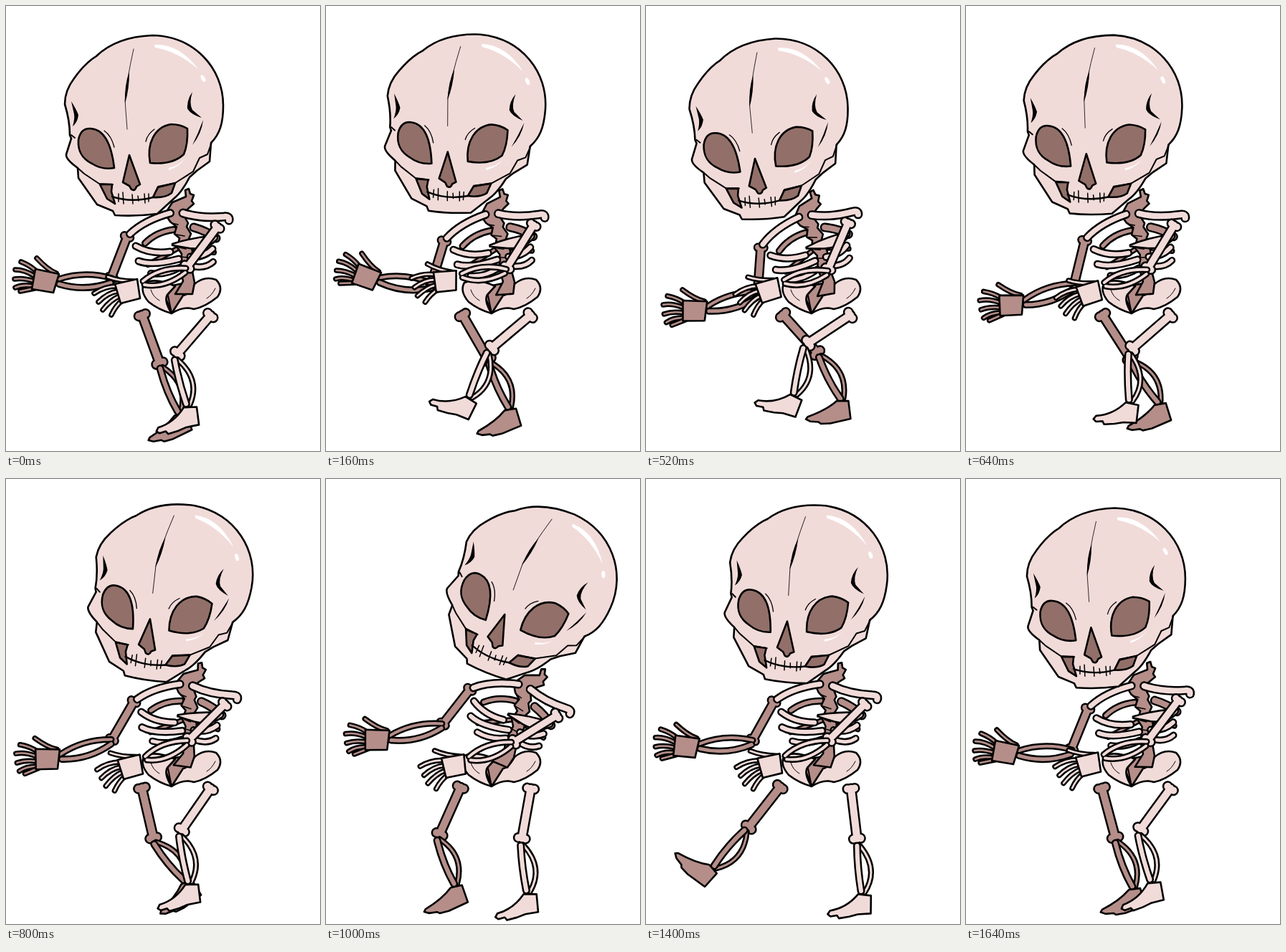
These frames come from a looping animation (438x621 px, 1680 ms). An HTML page:

```html
<!DOCTYPE html>
<html lang="en">
<head>
<meta charset="utf-8">
<title>Walking skeleton</title>
<style>
  html, body { margin: 0; width: 100%; height: 100%; overflow: hidden; background: #fff; }
  svg { display: block; width: 100%; height: 100%; }
</style>
</head>
<body>
<svg id="stage" viewBox="0 0 438 621" fill="none" stroke="#000" stroke-linecap="round" stroke-linejoin="round"></svg>
<script>
const LIGHT = '#f1dbd9', DARK = '#b58e89', HOLLOW = '#927069';
const LOOP = 1680, STEP = 40;
const times = [0, 320, 520, 800, 1000, 1200, 1400, 1640];

// pivot x, pivot y, parent, key in which the part is drawn, absolute angles in degrees
const joints = {
  torso:     [255, 385, null, 0, [0, -7.4, -9.6, 8, 23, 14, 8, 1]],
  head:      [243, 272, 'torso', 0, [0, 7.5, -1.2, 10.7, 24, 13.6, 7.6, .4]],
  farArm:    [170, 318, 'torso', 0, [111, 102, 94, 120, 128, 124, 119, 112]],
  farFore:   [145, 384, 'farArm', 0, [180, 191, 165, 164.5, 168, 172, 177, 180]],
  farHand:   [72, 385, 'farFore', 0, [190, 204, 180, 179, 180, 182, 186, 190]],
  nearArm:   [297, 305, 'torso', 0, [126.7, 117, 113, 135, 148, 139.5, 135, 127]],
  nearFore:  [250, 369, 'nearArm', 0, [163, 181.6, 168, 159, 161, 163, 160, 163]],
  nearHand:  [188, 392, 'nearFore', 0, [163, 177, 160, 162, 166, 168, 164, 163]],
  farThigh:  [190, 428, null, 5, [68, 50, 46, 75, 112, 137, 126, 73]],
  farShin:   [130, 481, 'farThigh', 5, [69, 66, 64, 52, 70, 101, 131.6, 70]],
  farFoot:   [117, 550, 'farShin', 5, [167, 175, 180, 156, 168, 187, 229, 172]],
  nearThigh: [286, 431, null, 5, [130.5, 146.7, 146.3, 124.5, 100, 83.3, 83, 126]],
  nearShin:  [295, 508, 'nearThigh', 5, [73.4, 137, 100, 77, 81, 83.5, 83, 73]],
  nearFoot:  [303, 578, 'nearShin', 5, [172, 230, 200, 172.4, 174, 177, 180, 169]]
};

const group = (name, ...parts) => `<g id="${name}">${parts.join('')}</g>`;
const shape = (d, fill, w = 2.6) => `<path d="${d}" fill="${fill}" stroke-width="${w}"/>`;
const line = (d, w = 2) => `<path d="${d}" stroke-width="${w}"/>`;
const blot = (d, fill = '#000') => `<path d="${d}" fill="${fill}" stroke="none"/>`;

// Outlined strokes: all black passes first, so that the parts merge
const bone = (color, ...strokes) => [['#000', 5], [color, 0]].map(([c, extra]) =>
  strokes.map(([d, w]) => `<path d="${d}" stroke="${c}" stroke-width="${w + extra}"/>`).join('')).join('');

// Shaft with a pair of knobs at each end
function longBone(color, x1, y1, x2, y2, w, knob) {
  const len = Math.hypot(x2 - x1, y2 - y1);
  const nx = -(y2 - y1) / len * knob * .5, ny = (x2 - x1) / len * knob * .5;
  const knobs = [[x1, y1], [x2, y2]].map(([x, y]) =>
    `M${x + nx} ${y + ny}h.01M${x - nx} ${y - ny}h.01`).join('');
  return bone(color, [`M${x1} ${y1}L${x2} ${y2}`, w], [knobs, knob]);
}

const fingers = (color, ...paths) => paths.map(d => bone(color, [d, 2.6])).join('');

const farArm = group('farArm',
  longBone(DARK, 169, 322, 147, 379, 9, 8),
  group('farFore',
    bone(DARK, ['M148 380Q110 369 74 381', 4], ['M146 386Q110 399 74 388', 5]),
    group('farHand',
      fingers(DARK, 'M70 373Q58 368 43 352', 'M43 371Q34 362 21 357', 'M40 377Q26 368 13 368',
        'M39 384Q24 379 12 381', 'M38 391Q24 388 13 393', 'M40 394L20 398'),
      shape('M41 367L74 374L66 400L36 395Z', DARK))));

const nearArm = group('nearArm',
  longBone(LIGHT, 295, 308, 253, 364, 9, 9),
  group('nearFore',
    bone(LIGHT, ['M251 366Q215 364 191 384', 4], ['M250 372Q222 394 193 389', 4]),
    group('nearHand',
      fingers(LIGHT, 'M178 384Q158 384 142 378', 'M155 391Q138 391 123 401', 'M156 398Q142 400 129 413',
        'M158 405Q146 410 135 424', 'M162 411Q153 418 147 431'),
      shape('M152 388L183 381L187 408L160 415Z', LIGHT))));

const leg = (side, color, thigh, tibia, fibula, foot) => group(side + 'Thigh',
  longBone(color, ...thigh, 10, 10),
  group(side + 'Shin',
    bone(color, [fibula, 3]), bone(color, [tibia, 6]),
    group(side + 'Foot', shape(foot, color))));

const farLeg = leg('far', DARK, [187, 429, 133, 476], 'M126 482Q116 514 115 546', 'M130 482Q148 520 119 548',
  'M108 550L124 552V577L95 580L82 579L79 576L68 574L62 570L65 567Q92 561 108 550Z');
const nearLeg = leg('near', LIGHT, [286, 432, 294, 502], 'M294 512Q294 542 299 575', 'M298 512Q325 545 304 577',
  'M295 580L313 581L314 606L296 608L284 612L270 615L267 611L258 613L254 610L257 605Q280 600 295 580Z');

const pelvis = shape('M232 390L258 385L266 400L231 428L222 406Z', DARK) +
  shape('M236 391Q210 379 193 386Q186 398 199 413Q213 424 231 429Q220 412 225 403Z', LIGHT) +
  shape('M263 388Q277 376 293 382Q304 393 295 406Q278 420 262 423Q248 418 231 429L247 404Q255 403 263 388Z', LIGHT) +
  line('M202 396Q205 406 214 411M292 394Q287 404 280 408', 1) + line('M231 429L226 404');

const torso = group('torso',
  farArm,
  bone(DARK, ['M262 309Q280 314 293 324', 8]),
  bone(DARK, ['M194 331Q210 315 234 312', 5], ['M198 361L240 338', 3], ['M262 338L290 344', 3]),
  shape('M222 290L232 274L251 266L250 257L255 255L257 262L262 264L259 272L262 276L255 282L247 290L254 303L252 308L258 318L255 325L260 342L258 360L263 386L260 402L236 402L247 384L243 366L245 346L239 337L242 324L235 318L238 308L229 301Z', DARK),
  line('M231 303L240 305M238 319L249 321M242 337L251 339M244 350L254 351M246 365L256 366', 1.5),
  bone(LIGHT, ['M181 335Q202 347 229 343', 6]),
  bone(LIGHT, ['M185 356Q204 363 241 353', 6]),
  bone(LIGHT, ['M202 373Q222 376 242 365', 5]),
  shape('M232 332Q260 323 287 321Q298 319 294 326Q280 341 256 338L232 334Z', LIGHT),
  bone(LIGHT, ['M257 350Q276 351 288 339', 6]),
  bone(LIGHT, ['M260 363Q278 367 289 357', 5]),
  bone(LIGHT, ['M229 289Q193 299 173 318', 7]),
  bone(LIGHT, ['M247 289Q272 297 304 294Q312 293 311 299', 8]),
  group('head',
    shape('M204 41C262 42 303 86 303 139C303 164 298 179 286 191L284 217L266 230L256 239Q245 260 235 268L211 290Q180 294 152 292L149 286L127 277L101 240L100 226Q83 214 84 207L91 185L89 180Q89 160 82 137Q82 118 95 101Q107 84 120 74L126 70Q154 43 204 41Z', LIGHT),
    line('M287 190L281 207L270 212L261 231L236 247L212 252L205 267M100 226L109 234L130 248L149 249M91 180L96 184'),
    shape('M131 249L148 249L147 259L152 276L141 269Z', HOLLOW),
    shape('M205 267L212 253L236 247L231 261Q222 268 205 267Z', HOLLOW),
    line('M148 266Q175 275 205 267', 2.4),
    line('M157 262V273M163 260L164 276M176 263L177 276M184 265L185 272M193 262L194 275M199 262V273', 1.5),
    shape('M101 187Q104 170 118 171C137 172 147 192 151 226Q134 229 120 220C106 213 100 203 101 187Z', HOLLOW),
    shape('M201 219C196 192 207 169 230 165Q243 165 253 171Q254 193 248 207Q232 222 201 219Z', HOLLOW),
    line('M137 174Q147 181 151 197M195 189Q197 179 207 172', 1.3),
    shape('M172 208L187 249L182 252Q180 259 175 256L172 251L163 246Z', HOLLOW),
    line('M178 60Q168 105 166 132L169 172', .8),
    blot('M172 92Q165 110 166 136Q172 116 172 92Z'),
    blot('M91 133Q98 144 101 152Q100 162 93 168Q96 158 95 151Z'),
    blot('M260 120Q255 136 260 145L273 156Q257 151 253 143Q252 131 260 120Z'),
    blot('M275 159Q273 178 260 194Q268 178 275 159Z'),
    blot('M207 54Q241 52 268 88Q239 63 208 58Z', '#fff'),
    '<ellipse cx="275" cy="101" rx="2.6" ry="5.2" transform="rotate(-28 275 101)" fill="#fff" stroke="none"/>',
    blot('M227 229Q243 224 250 212Q242 223 227 226Z', '#fff')),
  nearArm);

document.getElementById('stage').innerHTML = farLeg + nearLeg + pelvis + torso;

// Cubic interpolation through the keys, wrapping round the loop
function sample(values, t) {
  const n = times.length;
  const wrap = i => (i + n) % n;
  const timeAt = i => times[wrap(i)] + LOOP * Math.floor(i / n);
  const valueAt = i => values[wrap(i)];
  const slope = i => (valueAt(i + 1) - valueAt(i - 1)) / (timeAt(i + 1) - timeAt(i - 1));
  const i = times.findLastIndex(k => k <= t);
  const span = timeAt(i + 1) - timeAt(i), u = (t - timeAt(i)) / span, v = 1 - u;
  return v * v * (1 + 2 * u) * valueAt(i) + u * u * (1 + 2 * v) * valueAt(i + 1) +
    u * v * span * (v * slope(i) - u * slope(i + 1));
}

function draw() {
  const t = Math.floor(performance.now() % LOOP / STEP) * STEP;
  const turn = {};
  for (const [name, [x, y, parent, drawnAt, angles]] of Object.entries(joints)) {
    turn[name] = sample(angles, t) - angles[drawnAt];
    const angle = turn[name] - (parent ? turn[parent] : 0);
    document.getElementById(name).setAttribute('transform', `rotate(${angle} ${x} ${y})`);
  }
  requestAnimationFrame(draw);
}
draw();
</script>
</body>
</html>
```
